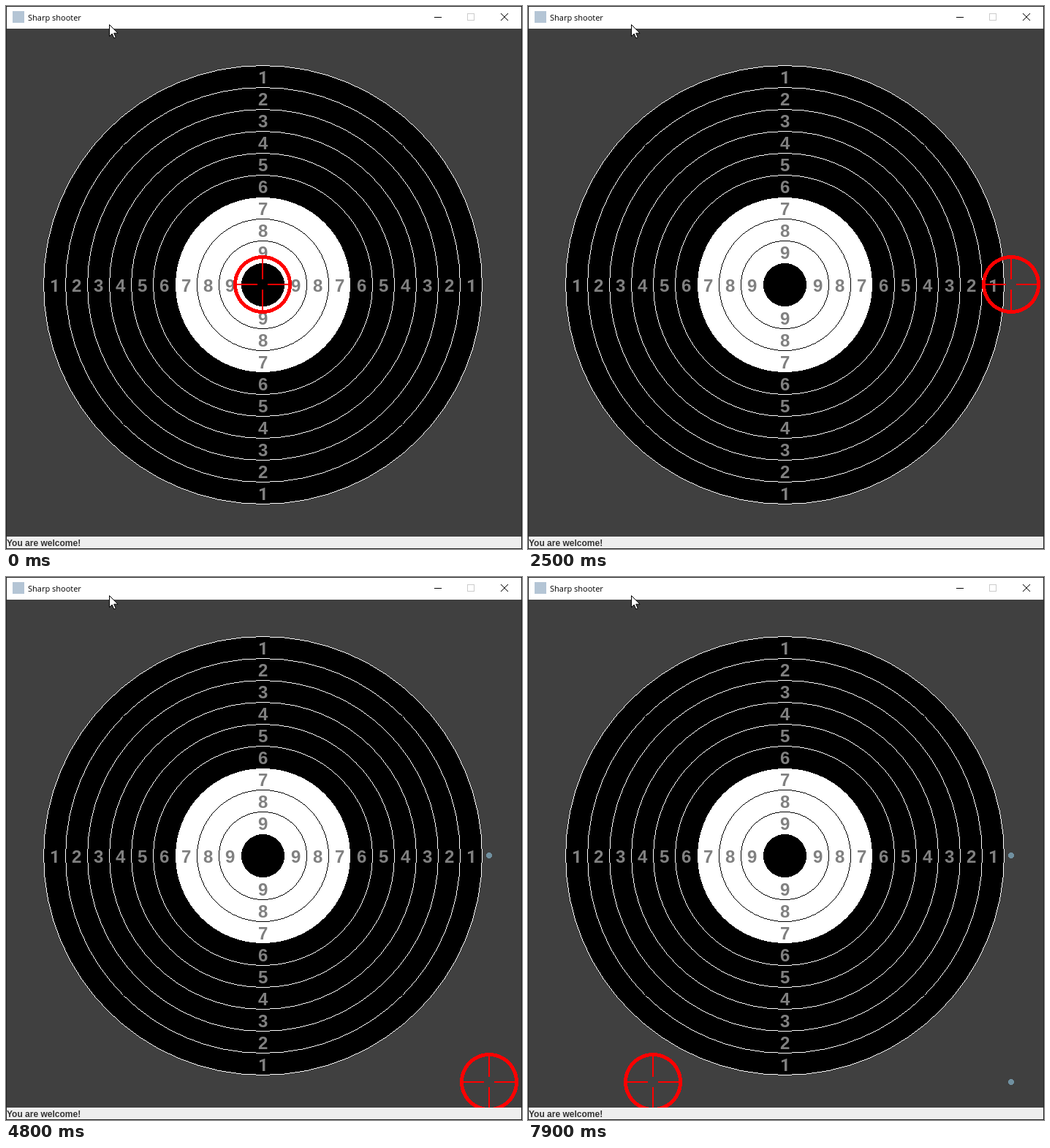
An HTML page with a canvas that plays this animation: 706x743 px, repeating every 8 s.

```html
<!DOCTYPE html>
<html lang="en">
<head>
<meta charset="utf-8">
<title>Sharp shooter</title>
<style>
  html, body { margin: 0; width: 100%; height: 100%; overflow: hidden; }
  canvas { display: block; }
</style>
</head>
<body>
<canvas id="stage" width="706" height="743"></canvas>
<script>
const W = 706, H = 743, LOOP = 8000, STEP = 100, GRID = 10;
const PANEL = { x: 1, y: 31, w: 704, h: 695 };
const CX = 351, CY = 381;

// Each move: start time, number of 100 ms steps, destination
const START = [351, 381];
const MOVES = [
  [1100, 1, 361, 381],
  [1600, 4, 491, 381],
  [2100, 5, 661, 381],
  [3300, 1, 661, 391],
  [3800, 3, 661, 471],
  [4200, 7, 661, 691],
  [5900, 1, 651, 691],
  [6300, 1, 641, 691],
  [6500, 1, 601, 691],
  [6600, 8, 341, 691],
  [7400, 1, 311, 691],
  [7600, 4, 171, 691]
];
const SHOTS = [[2900, 661, 381], [5600, 661, 691]];

const ctx = document.getElementById('stage').getContext('2d', { alpha: false });
const backdrop = document.createElement('canvas');
backdrop.width = W;
backdrop.height = H;

function rect(c, color, x, y, w, h) {
  c.fillStyle = color;
  c.fillRect(x, y, w, h);
}

// Hard-edged ring, filled row by row; an inner radius of 0 gives a disc
function ring(c, color, cx, cy, inner, outer) {
  const column = x => Math.ceil(x - 0.5);
  const span = (y, x1, x2) => c.fillRect(x1, y, x2 - x1, 1);
  c.fillStyle = color;
  for (let y = Math.floor(cy - outer); y < cy + outer; y++) {
    const dy = y + 0.5 - cy;
    if (Math.abs(dy) >= outer) continue;
    const far = Math.sqrt(outer * outer - dy * dy);
    const left = column(cx - far), right = column(cx + far);
    if (Math.abs(dy) < inner) {
      const near = Math.sqrt(inner * inner - dy * dy);
      span(y, left, column(cx - near));
      span(y, column(cx + near), right);
    } else {
      span(y, left, right);
    }
  }
}

// One-pixel circle: each quarter is a Bezier curve flattened to 16 chords
function outline(c, color, r) {
  const CHORDS = 16, K = 0.5523;
  const curve = t => r * ((1 - t) ** 3 + 3 * t * (1 - t) ** 2 + 3 * K * t * t * (1 - t));
  const plot = (x, y) => {
    for (const px of [x, -x]) {
      for (const py of [y, -y]) c.fillRect(CX + px, CY + py, 1, 1);
    }
  };
  c.fillStyle = color;
  for (let i = 0; i < CHORDS; i++) {
    const t1 = i / CHORDS, t2 = (i + 1) / CHORDS;
    const x1 = curve(t1), y1 = curve(1 - t1);
    const x2 = curve(t2), y2 = curve(1 - t2);
    const slope = (x2 - x1) / (y2 - y1);
    if (Math.abs(slope) < 1) {
      for (let y = Math.ceil(y1); y <= y2; y++) {
        plot(Math.round(x1 + (y - y1) * slope), y);
      }
    } else {
      for (let x = Math.ceil(x2); x <= x1; x++) {
        plot(x, Math.round(y1 + (x - x1) / slope));
      }
    }
  }
}

function text(c, value, x, y, font, color) {
  c.font = font;
  c.fillStyle = color;
  c.fillText(value, x, y);
}

function drawTitleBar(c) {
  rect(c, '#fff', 1, 1, 704, 30);
  rect(c, '#b4c5d5', 9, 7, 16, 16);
  text(c, 'Sharp shooter', 30, 20, '11px "Open Sans", sans-serif', '#000');

  rect(c, '#000', 586, 15, 10, 1);
  c.lineWidth = 1;
  c.strokeStyle = '#ccc';
  c.strokeRect(631.5, 10.5, 9, 9);
  c.strokeStyle = '#000';
  c.beginPath();
  c.moveTo(677, 10);
  c.lineTo(687, 20);
  c.moveTo(687, 10);
  c.lineTo(677, 20);
  c.stroke();
}

function drawTarget(c) {
  const x = CX + 0.5, y = CY + 0.5;
  ring(c, '#000', x, y, 0, 299.5);
  ring(c, '#fff', x, y, 0, 120);
  ring(c, '#000', x, y, 0, 29.5);
  for (let score = 1; score <= 9; score++) {
    const r = 330 - score * 30, mid = r - 15;
    outline(c, score < 7 ? '#fff' : '#000', r);
    // Roboto has a numeral one without a foot
    const family = score === 1 ? 'Roboto' : '"Liberation Sans"';
    for (const [dx, dy] of [[-mid, 0], [mid, 0], [0, -mid], [0, mid]]) {
      text(c, score, CX - 6 + dx, CY + 10 + dy, `bold 24px ${family}, sans-serif`, '#808080');
    }
  }
}

function drawPointer(c) {
  const shape = new Path2D(
    'M141.5 25.5V41.5L145.2 38L147.8 44L150.3 43L147.7 37.2H153Z');
  c.fillStyle = '#fff';
  c.fill(shape);
  c.strokeStyle = '#000';
  c.lineWidth = 1;
  c.stroke(shape);
}

function drawBackdrop(c) {
  rect(c, '#222', 0, 0, W, H);
  rect(c, '#404040', PANEL.x, PANEL.y, PANEL.w, PANEL.h);
  drawTitleBar(c);
  drawTarget(c);
  rect(c, '#eee', 1, 726, 704, 16);
  text(c, 'You are welcome!', 1, 739,
    'bold 12px "Liberation Sans", Arial, sans-serif', '#333');
  drawPointer(c);
}

function scopeAt(t) {
  let [x, y] = START;
  for (const [start, steps, toX, toY] of MOVES) {
    if (t < start) break;
    const done = Math.min(steps, Math.floor((t - start) / STEP) + 1) / steps;
    const snap = distance => Math.round(distance * done / GRID) * GRID;
    x += snap(toX - x);
    y += snap(toY - y);
  }
  return [x, y];
}

function drawScope(c, x, y) {
  const red = '#f00';
  ring(c, red, x, y, 35, 40);
  rect(c, red, x - 36, y - 1, 29, 2);
  rect(c, red, x + 7, y - 1, 29, 2);
  rect(c, red, x - 1, y - 36, 2, 29);
  rect(c, red, x - 1, y + 7, 2, 29);
}

function draw(t) {
  ctx.drawImage(backdrop, 0, 0);
  ctx.save();
  ctx.beginPath();
  ctx.rect(PANEL.x, PANEL.y, PANEL.w, PANEL.h);
  ctx.clip();
  for (const [time, x, y] of SHOTS) {
    if (t >= time) ring(ctx, '#7090a0', x, y, 0, 4);
  }
  drawScope(ctx, ...scopeAt(t));
  ctx.restore();
}

const began = performance.now();
function tick() {
  draw((performance.now() - began) % LOOP);
  requestAnimationFrame(tick);
}

drawBackdrop(backdrop.getContext('2d', { alpha: false }));
tick();
</script>
</body>
</html>
```
